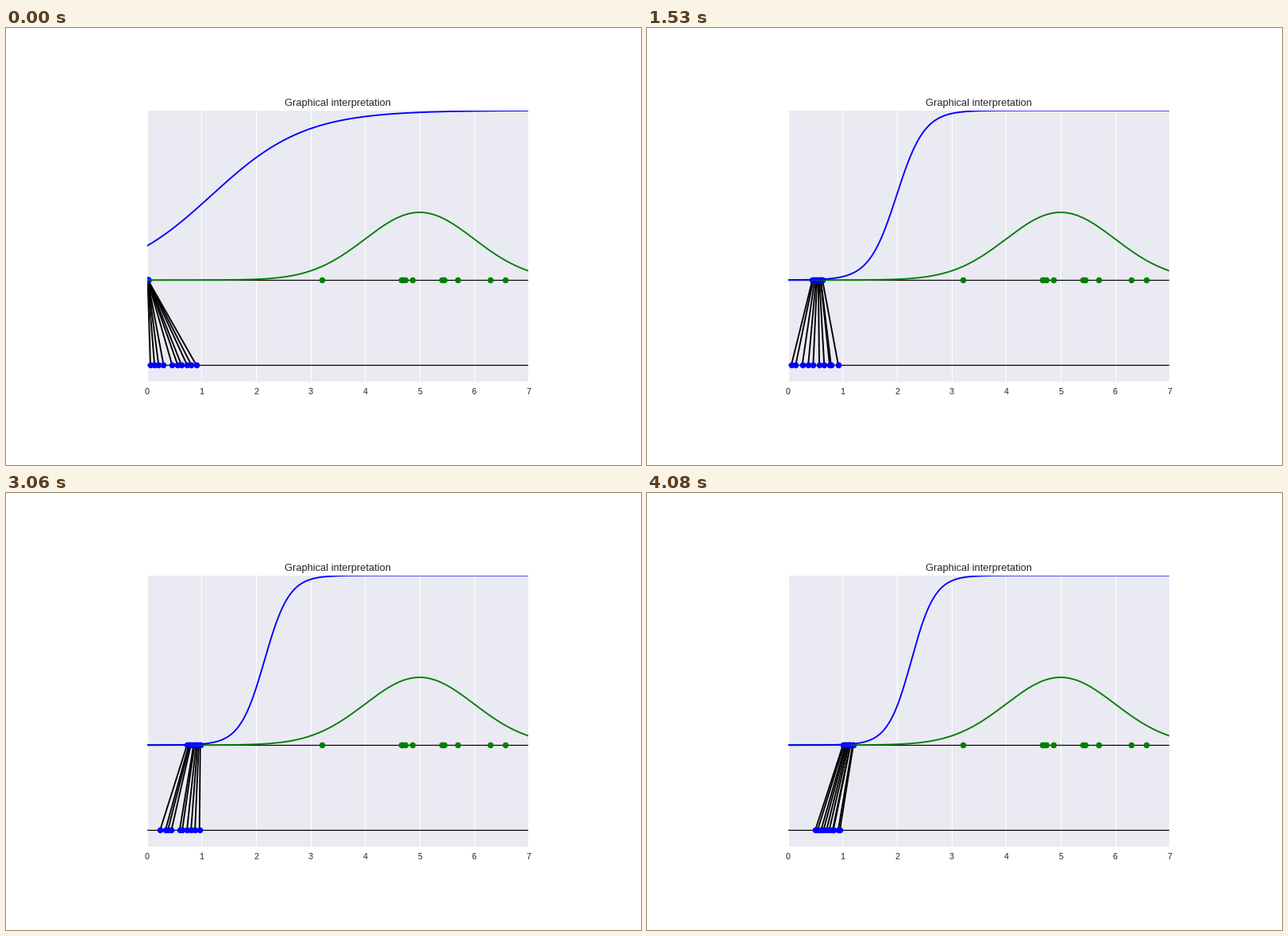
A matplotlib script that plays this animation: 800 by 550 pixels, repeating every 4.25 s.

```python
import numpy as np
import matplotlib.pyplot as plt
from matplotlib.animation import FuncAnimation

W, H, DPI = 800, 550, 100
FRAMES, STEP_MS = 25, 170
LEFT, TOP, AX_W, AX_H = 177.8, 103.7, 480.6, 341.6
COUNT, NOISE_Y = 10, -0.5
DARK = "0.15"

REAL = [3.21, 4.66, 4.70, 4.735, 4.865, 5.40, 5.455, 5.70, 6.30, 6.565]


def px(n):
    """Pixels to points."""
    return n * 72 / DPI


def noise(step):
    """Ten jittered samples; their range narrows and widens over the loop."""
    rng = np.random.default_rng(step)
    low = np.interp(step, [0, 9, 18, 22, 24], [0.06, 0.06, 0.24, 0.05, 0.50])
    high = np.interp(step, [0, 9, 15, 18, 24], [0.90, 0.92, 0.77, 0.96, 0.95])
    jitter = rng.uniform(-0.04, 0.04, COUNT)
    jitter[[0, -1]] = 0
    return np.linspace(low, high, COUNT) + jitter


def generate(z, step):
    """Affine generator, slowly widening and moving right."""
    start = np.exp(-step / 1.5)
    offset = 0.215 + 0.0242 * step - 0.205 * start
    scale = 0.09 + 0.0138 * step - 0.085 * start
    return offset + scale * z


def discriminate(x, step):
    """Logistic discriminator, steepening quickly and then drifting."""
    slope = 1.165 + 0.7 * np.log(1 + 5.7 * step)
    center = 1.83 + 0.018 * step - 0.648 * np.exp(-step / 1.2)
    return 1 / (1 + np.exp(-slope * (x - center)))


plt.rcParams["font.family"] = "Liberation Sans"
fig = plt.figure(figsize=(W / DPI, H / DPI), dpi=DPI, facecolor="white")
ax = fig.add_axes([LEFT / W, 1 - (TOP + AX_H) / H, AX_W / W, AX_H / H],
                  facecolor="#EAEAF2")
ax.set(xlim=(0, 7), ylim=(-0.6, 1), xticks=range(8), yticks=[])
ax.set_axisbelow(True)
ax.grid(axis="x", color="white", lw=px(1.1))
ax.spines[:].set_visible(False)
ax.tick_params(length=0, pad=px(7.5), labelsize=px(10.8), labelcolor=DARK)
ax.set_title("Graphical interpretation", fontsize=px(12.9), color=DARK,
             pad=px(6))

x = np.linspace(0, 7, 400)
curve = dict(lw=px(1.9), solid_capstyle="round")
dots = dict(ls="", marker="o", ms=px(7.6), mew=0)

for y in (0, NOISE_Y):
    ax.plot([0, 7], [y, y], color="black", lw=px(1.2))
links = [ax.plot([], [], color="black", **curve)[0] for _ in range(COUNT)]
noise_dots, = ax.plot([], [], color="blue", **dots)
fake_dots, = ax.plot([], [], color="blue", **dots)
ax.plot(REAL, np.zeros(len(REAL)), color="green", **dots)
ax.plot(x, np.exp(-(x - 5) ** 2 / 2) / np.sqrt(2 * np.pi), color="green",
        **curve)
decision, = ax.plot([], [], color="blue", **curve)


def draw(step):
    z = noise(step)
    fake = generate(z, step)
    for link, a, b in zip(links, z, fake):
        link.set_data([a, b], [NOISE_Y, 0])
    noise_dots.set_data(z, np.full(COUNT, NOISE_Y))
    fake_dots.set_data(fake, np.zeros(COUNT))
    decision.set_data(x, discriminate(x, step))
    return [*links, noise_dots, fake_dots, decision]


anim = FuncAnimation(fig, draw, frames=FRAMES, interval=STEP_MS,
                     repeat=True, repeat_delay=0)
plt.show()
```
